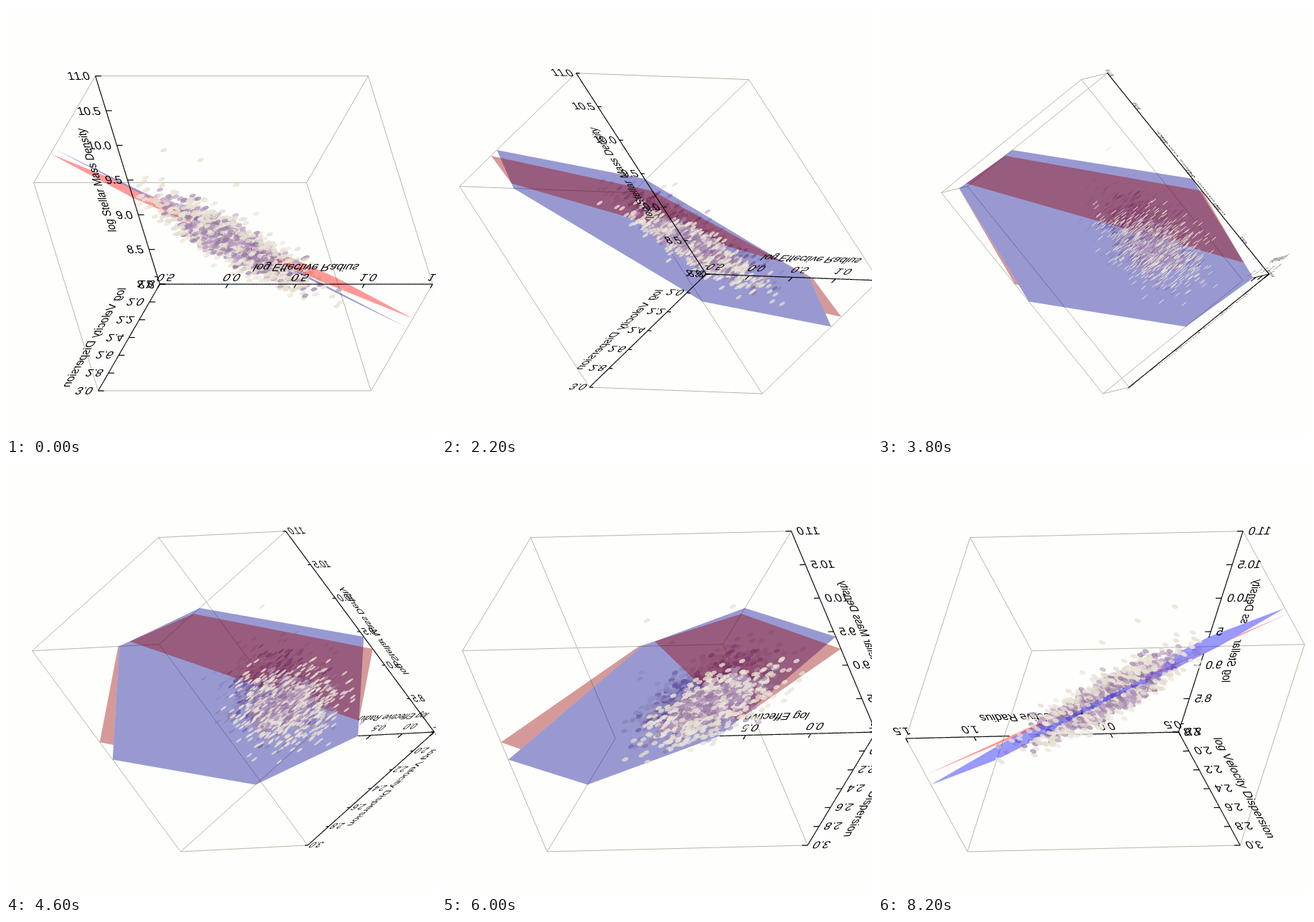
An HTML page with a canvas for the animation above (8400 ms loop, 600 px wide and 600 px high).

```html
<!DOCTYPE html>
<html>
<head>
<meta charset="utf-8">
<style>
html, body { margin: 0; width: 100%; height: 100%; overflow: hidden; background: #fefefd; }
canvas { display: block; }
</style>
</head>
<body>
<canvas id="stage" width="600" height="600"></canvas>
<script>
const ctx = document.getElementById('stage').getContext('2d');
const STEP = 200, STEPS = 42, RAD = Math.PI / 180;
const SIZE = [420, 252, 360];            // edge lengths: radius, velocity, density
const CENTER = [317, 317.3];
const R = 0, V = 1, Z = 2;

// Planes: z = a + b r + c v in unit box coordinates
const RED = { a: 0.414, b: -0.672, c: 0.803, dim: 'rgba(150,0,0,0.4)', lit: 'rgba(255,0,0,0.4)' };
const BLUE = { a: 0.474, b: -0.79, c: 0.774, dim: 'rgba(0,0,145,0.4)', lit: 'rgba(0,0,255,0.4)' };
const PLANES = [RED, BLUE];
for (const p of PLANES) {
  const { a, b, c } = p;
  p.corners = [[0, 0, a], [-a / b, 0, 0], [1, -(a + b) / c, 0],
    [1, 1, a + b + c], [(1 - a - c) / b, 1, 1], [0, (1 - a) / c, 1]];
}

let seed = 20117;
function rand() {
  seed = (seed * 1664525 + 1013904223) % 4294967296;
  return seed / 4294967296;
}
function gauss() {
  return Math.sqrt(-2 * Math.log(1 - rand())) * Math.cos(2 * Math.PI * rand());
}

const dots = [];
for (let i = 0; i < 2200; i++) {
  const g = [gauss(), gauss(), gauss()];
  const r = 0.435 + 0.108 * g[0];
  const v = 0.34 + 0.082 * (0.4 * g[0] + 0.92 * g[1]);
  const z = 0.426 - 0.735 * r + 0.788 * v + 0.055 * g[2];
  const d2 = g[0] * g[0] + g[1] * g[1] + g[2] * g[2];
  const dark = rand() < 0.75 * Math.exp(-d2 / 6);
  const k = Math.floor(rand() * 55);
  const color = dark
    ? `rgba(${135 + k},${105 + k},${145 + k},0.6)`
    : `rgba(${226 + k / 4},${219 + k / 4},${204 + k / 3},0.75)`;
  dots.push({ p: [r, v, z], color });
}
for (const p of [[0.244, 0.225, 0.759], [0.467, 0.51, 0.857], [0.498, 0.303, 0.632]])
  dots.push({ p, color: 'rgba(230,226,200,0.75)' });

let axes;                                // unit axes as [x, y up, toward viewer]

const turnY = ([x, y, w], t) =>
  [x * Math.cos(t) + w * Math.sin(t), y, w * Math.cos(t) - x * Math.sin(t)];
const turnX = ([x, y, w], t) =>
  [x, y * Math.cos(t) + w * Math.sin(t), w * Math.cos(t) - y * Math.sin(t)];

// The box first leans a little, then spins by half a turn
function setView(n) {
  const tilt = 36.2 * RAD, s = Math.sin(tilt), c = Math.cos(tilt);
  const lean = 2.9 * RAD * Math.min(n / 5, 1);
  const spin = 5 * RAD * Math.max(n - 5, 0);
  axes = [[1, 0, 0], [0, -s, -c], [0, c, -s]]
    .map(u => turnY(turnX(turnY(u, 25 * RAD), lean), spin));
}

function project(p) {
  let [x, y] = CENTER;
  for (let i = 0; i < 3; i++) {
    const d = (p[i] - 0.5) * SIZE[i];
    x += d * axes[i][0];
    y -= d * axes[i][1];
  }
  return [x, y];
}

const screenLen = axis => Math.hypot(axes[axis][0], axes[axis][1]) || 1e-6;

// Box point moved by px along one axis
function shift(p, axis, px) {
  const q = p.slice();
  q[axis] += px / SIZE[axis];
  return q;
}

const toward = () => axes.map((u, i) => u[2] / SIZE[i]);
const slope = (p, d) => d[Z] - p.b * d[R] - p.c * d[V];

// Distance toward the viewer at which a point meets a plane
const reach = (pt, p) =>
  (p.a + p.b * pt[R] + p.c * pt[V] - pt[Z]) / slope(p, toward());

function isCovered(pt, plane) {
  const d = toward(), t = reach(pt, plane);
  return t > 0.5 && pt.every((q, i) => {
    const h = q + t * d[i];
    return h >= 0 && h <= 1;
  });
}
const isHidden = pt => PLANES.some(p => isCovered(pt, p));

function path(pts) {
  ctx.beginPath();
  pts.forEach((p, i) => ctx[i ? 'lineTo' : 'moveTo'](...project(p)));
}

function line(a, b) {
  path([a, b]);
  ctx.stroke();
}

function drawBox() {
  ctx.strokeStyle = '#b6b8a2';
  ctx.lineWidth = 1;
  for (let i = 0; i < 3; i++)
    for (const m of [1, 2, 3]) {
      const a = [0, 0, 0];
      a[(i + 1) % 3] = m & 1;
      a[(i + 2) % 3] = m >> 1;
      const b = a.slice();
      b[i] = 1;
      line(a, b);
    }
}

// Part of a polygon where side(p) > 0
function cut(pts, side) {
  const out = [];
  pts.forEach((p, i) => {
    const q = pts[(i + 1) % pts.length], sp = side(p), sq = side(q);
    if (sp > 0) out.push(p);
    if (sp > 0 !== sq > 0) out.push(p.map((c, k) => c + (q[k] - c) * sp / (sp - sq)));
  });
  return out;
}

function fillPlane(plane, pts) {
  path(pts);
  ctx.fillStyle = slope(plane, toward()) < 0 ? plane.dim : plane.lit;
  ctx.fill();
}

// Red tints blue where it is nearer and vanishes where blue covers it
function drawPlanes() {
  fillPlane(BLUE, BLUE.corners);
  fillPlane(RED, cut(RED.corners, p => -reach(p, BLUE)));
  ctx.save();
  path(BLUE.corners);
  ctx.closePath();
  ctx.rect(0, 0, 600, 600);
  ctx.clip('evenodd');
  fillPlane(RED, cut(RED.corners, p => reach(p, BLUE)));
  ctx.restore();
}

function drawDot({ p, color }) {
  const [x, y] = project(p), u = axes[R], v = axes[V];
  ctx.beginPath();
  for (let i = 0; i < 6; i++) {
    const a = 4.5 * Math.cos(i * Math.PI / 3), b = 4.5 * Math.sin(i * Math.PI / 3);
    ctx.lineTo(x + a * u[0] + b * v[0], y - a * u[1] - b * v[1]);
  }
  ctx.closePath();
  ctx.fillStyle = ctx.strokeStyle = color;
  ctx.lineWidth = 0.8;
  ctx.fill();
  ctx.stroke();
}

// Text lying in the plane of two axes; align: 0 left, 0.5 middle, 1 right
function drawText(str, at, base, up, flip, align, size) {
  const fit = (axis, em, sign) => {
    const len = screenLen(axis);
    const k = sign * Math.min(em, 27 * len) / len / 16;
    return [axes[axis][0] * k, -axes[axis][1] * k];
  };
  const b = fit(base, size, 1), u = fit(up, 16.5, flip);
  const px = Math.hypot(...b) / screenLen(base);   // box pixels per font pixel
  const full = ctx.measureText(str).width;
  const [ox, oy] = project(at);
  ctx.save();
  ctx.setTransform(b[0], b[1], -u[0], -u[1], ox, oy);
  for (let i = 0; i < str.length; i++) {
    const x = ctx.measureText(str.slice(0, i)).width - full * align;
    const mid = x + ctx.measureText(str[i]).width / 2;
    if (!isHidden(shift(at, base, mid * px))) ctx.fillText(str[i], x, 5.6);
  }
  ctx.restore();
}

function drawAxis(axis, tickDir, labels) {
  const parts = 100;
  for (let i = 0; i < parts; i++) {
    const [a, m, b] = [0, 0.5, 1].map(k => {
      const p = [0, 0, 0];
      p[axis] = (i + k) / parts;
      return p;
    });
    if (!isHidden(m)) line(a, b);
  }
  labels.forEach((s, i) => {
    const p = [0, 0, 0];
    p[axis] = i / (labels.length - 1);
    if (!isHidden(p)) line(p, shift(p, tickDir, 9));
    if (axis === R) drawText(s, shift(p, V, -16), R, V, 1, 0.5, 16.5);
    else drawText(s, shift(p, R, -9), R, axis, 1, 1, 16.5);
  });
}

const range = (from, step, count) =>
  Array.from({ length: count }, (_, i) => (from + i * step).toFixed(1));

function drawAxes() {
  ctx.strokeStyle = ctx.fillStyle = '#000';
  ctx.lineWidth = 1.2;
  ctx.font = '16px "Liberation Sans", Arial, sans-serif';
  drawAxis(R, V, range(-0.5, 0.5, 5));
  drawAxis(V, R, range(1.8, 0.2, 7));
  drawAxis(Z, R, range(8, 0.5, 7));
  const gap = Math.min(49 / screenLen(R), 70);
  drawText('log Effective Radius', shift([0.5, 0, 0], V, -40), R, V, 1, 0.5, 16.5);
  drawText('log Velocity Dispersion', shift([0, 0.5, 0], R, -gap), V, R, -1, 0.5, 15.9);
  drawText('log Stellar Mass Density', shift([0, 0, 0.5], R, -48), Z, R, -1, 0.5, 14.1);
}

function draw(n) {
  setView(n);
  ctx.fillStyle = '#fefefd';
  ctx.fillRect(0, 0, 600, 600);
  drawBox();
  const behind = dots.filter(d => isHidden(d.p));
  const front = dots.filter(d => !behind.includes(d));
  behind.forEach(drawDot);
  drawPlanes();
  const layers = [() => front.forEach(drawDot), drawAxes];
  const depth = axes.reduce((sum, u, i) => sum + u[2] * SIZE[i], 0);
  if (depth > 0) layers.reverse();       // axes at the far side
  layers.forEach(f => f());
}

let shown = -1;
const start = performance.now();
function tick(now) {
  const n = Math.floor(Math.max(0, now - start) / STEP) % STEPS;
  if (n !== shown) draw(shown = n);
  requestAnimationFrame(tick);
}
draw(shown = 0);
requestAnimationFrame(tick);
</script>
</body>
</html>
```
